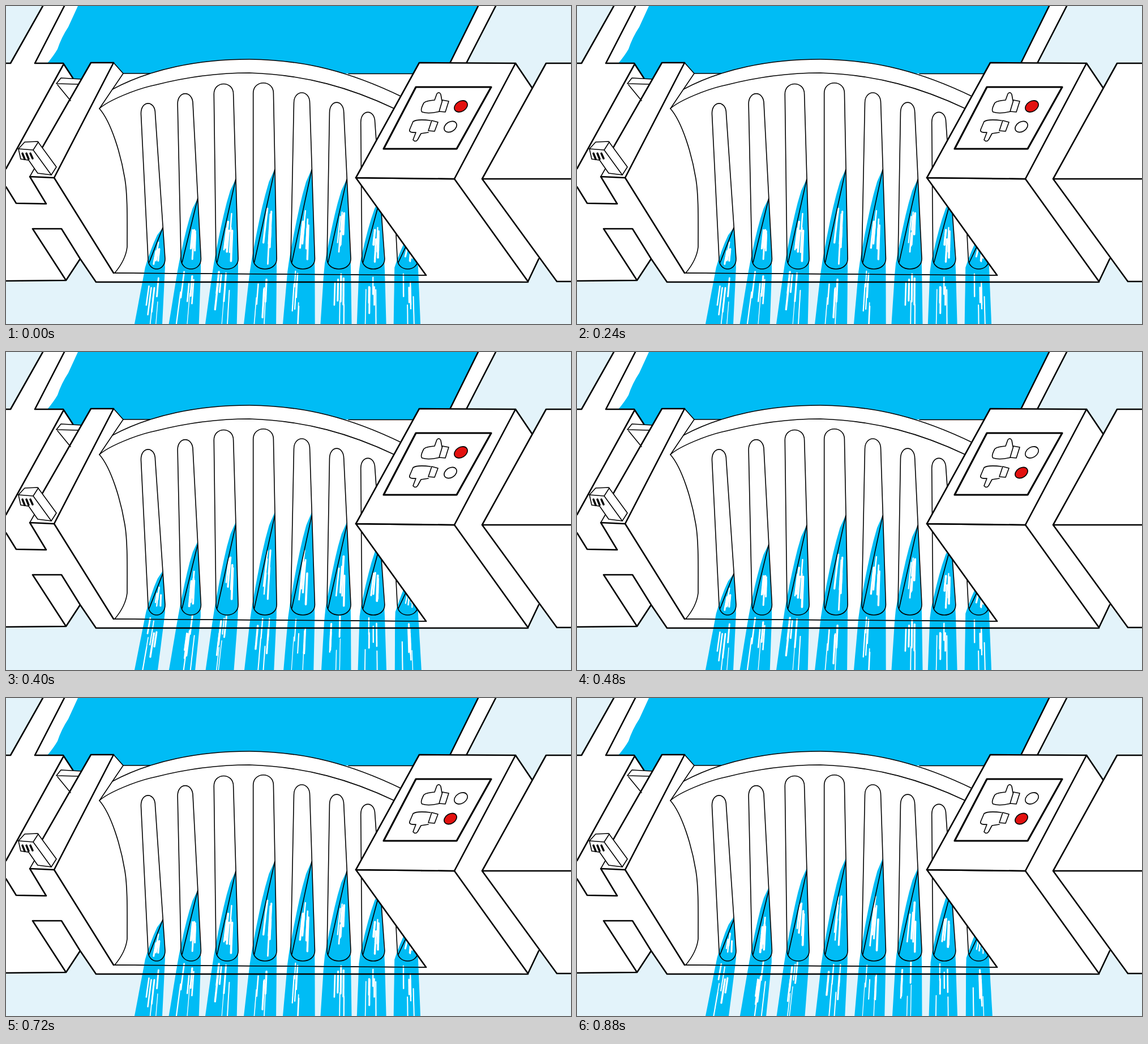
An HTML page for the animation above (960 ms loop, 998 by 561 pixels).

```html
<!DOCTYPE html>
<html lang="en">
<head>
<meta charset="utf-8">
<title>Water gate</title>
<style>
  html, body { margin: 0; height: 100%; overflow: hidden; background: #fff; }
  svg { display: block; width: 100vw; height: 100vh; }
  path, ellipse { fill: none; stroke: #000; stroke-width: 2.6; stroke-linejoin: round; stroke-linecap: round; }
  .thin path, .thin { stroke-width: 1.6; }
  .white { fill: #fff; }
  .sky { fill: #e3f3fa; stroke: none; }
  .blue { fill: #00bcf5; stroke: none; }
  .streak { stroke: #fff; }
  .lit { fill: #e3110f; }
</style>
</head>
<body>
<svg viewBox="0 0 998 561" preserveAspectRatio="none">
  <!-- ground and basin -->
  <path class="sky" d="M0 0H65L8 101H0Z M865 0H998V101H954L929 144 900 101H813Z
    M0 485H106L131 446 159 487H922L941 446 973 486H998V561H0Z"/>
  <path class="blue" d="M127 0H834L785 101H730L720 119H207L190 100H150L133 128H118L101 101H73Q84 88 91 76 98 55 110 37Z"/>
  <path d="M65 0 8 101H0 M103 0 51 101H101L118 127 M834 0 784 101 M865 0 813 101"/>

  <!-- rack -->
  <g class="thin">
    <path d="M190 100 207 119H258 M605 119.500H722 M207 119 188 147"/>
    <path class="white" d="M165 181 188 147C255 111 340 94 430 94 530 95 610 117 699 160L686 181Z"/>
    <path class="white" d="M165 181C180 167 230 146 265 139 320 125 375 118 430 118 530 121 610 145 686 181L742 475 192 471
      C203 458 212 443 214 425 214 380 215 335 210 305 203 262 186 205 165 181"/>
  </g>
  <g id="water"></g>
  <g id="slots" class="thin"></g>

  <!-- left gate -->
  <path d="M190 471 85 303 42 301 71 349 18 348 0 319 M101 104 0 287 M47 393H98L131 446 159 487H922
    M47 393 106 484 131 446 M106 484 0 485"/>
  <path class="white" d="M85 303 190 100H150L57 262"/>
  <g class="thin">
    <path d="M190 471 742 475 M133 129 97 127 89 137 127 138 M91 139 114 167"/>
    <path class="white" d="M22 252 33 240 56 239 89 284 80 298 56 295 40 272 26 270Z"/>
    <path d="M22 252 48 254 57 240 M48 254 80 298 M42 301 50 287"/>
    <path style="stroke-width:3.5" d="M29 260 33 270 M36 260 40 270 M43 260 47 269"/>
  </g>

  <!-- control block -->
  <path class="white" d="M618 303 792 305 922 486 742 475Z" style="stroke:none"/>
  <path d="M742 475 618 303 792 305 922 486 941 446"/>
  <path class="white" d="M618 303 730 100 900 101 792 305Z"/>
  <path d="M900 101 929 144 M998 101H954L841 305H998 M841 305 973 486H998"/>
  <path style="stroke-width:3.2" d="M724 143H857L796 252H667Z"/>
  <g class="thin">
    <path d="M766 186Q746 191 735 187 731 184 738 171 742 167 757 166L761 155Q765 150 768 156L770 167
      M771 166 782 168 776 187 765 186Z"/>
    <path d="M750 202Q726 199 719 204L713 218Q711 224 724 223L719 236Q723 241 727 236L733 225 746 223
      M752 202 763 205 757 221 746 220Z"/>
    <ellipse id="up" rx="12.5" ry="9" transform="translate(803.5 177) rotate(-32)" class="thin"/>
    <ellipse id="down" rx="12" ry="8.5" transform="translate(785 213) rotate(-32)" class="thin"/>
  </g>
</svg>
<script>
const COUNT = 8, LIP = 460, BOTTOM = 561;
const $ = id => document.getElementById(id);
const mix = (a, b, t) => a + (b - a) * t;
const range = n => [...Array(n).keys()];

let seed = 7;
const rand = (a, b) => {
  seed = (seed * 16807) % 2147483647;
  return mix(a, b, seed / 2147483647);
};

function addPath(parent, attrs) {
  const el = document.createElementNS("http://www.w3.org/2000/svg", "path");
  for (const key in attrs) el.setAttribute(key, attrs[key]);
  return parent.appendChild(el);
}

const line = points => "M" + points.map(p => p.map(v => v.toFixed(1)).join(" ")).join("L");

// The slots fan out along the arch, tallest and widest near the middle
const slots = range(COUNT).map(i => {
  const sway = Math.sin(i * Math.PI / 3);
  const topX = 251 + 71 * i - 1.05 * i * i - 5 * sway;
  const lowX = 266 + 63.8 * i - 3.5 * sway;
  const topHalf = 12.5 + 6 * Math.exp(-(((i - 2.6) / 1.2) ** 2));
  const lowHalf = 15 + 3 * i - 0.36 * i * i;
  const top = 128 + 17.2 * Math.abs(i - 2.55);
  const tipY = 285 + 8.6 * (i - 3.5) ** 2;
  const topRight = topX + topHalf, right = lowX + lowHalf;
  return {
    i, top, topLeft: topX - topHalf, topRight, left: lowX - lowHalf, right, tipY,
    tipX: mix(topRight, right, (tipY - top - 18) / (428 - top))
  };
});

// Offsets of each pose from its slot; left and right are taken where the water leaves the stage
const poses = [
  { tip: 0, lip: -5, left: i => 2.5 * i - 24, right: i => 1.3 * i - 5, dense: 6 },
  { tip: 3, lip: -1, left: () => -7, right: () => -2, dense: 4 },
  { tip: -5, lip: -4, left: i => 2.8 * i - 24, right: i => 2.7 * i - 13, dense: 5 }
];

function drawStream(group, slot, pose) {
  const tipY = slot.tipY + pose.tip, fall = LIP - tipY;
  const at = (y, side) => {
    const u = (y - tipY) / fall, v = (y - LIP) / (BOTTOM - LIP);
    const lip = slot.left + pose.lip;
    const left = u < 1 ? mix(slot.tipX, lip, u ** 0.7) : lip + (slot.left + pose.left(slot.i) - lip) * v;
    const right = u < 1 ? mix(slot.tipX, slot.right, u) : slot.right + pose.right(slot.i) * v;
    return [mix(left, right, side), y];
  };
  const run = (from, to, side) => range(13).map(k => at(mix(from, to, k / 12), side));
  const streak = (from, length, side, width) => addPath(group, {
    class: "streak", d: line(run(from, from + length, side)), style: `stroke-width:${width.toFixed(1)}`
  });

  addPath(group, { class: "blue", d: line([...run(tipY, BOTTOM, 0), ...run(tipY, BOTTOM, 1).reverse()]) + "Z" });
  for (let k = 0; k < pose.dense; k++) {
    streak(tipY + fall * rand(0.38, 0.62), fall * rand(0.2, 0.36), rand(0.35, 0.75), rand(2, 4));
  }
  for (let k = 0; k < 4; k++) streak(rand(465, 500), rand(25, 50), rand(0.25, 0.75), rand(2, 3.6));
  for (let k = 0; k < 2; k++) streak(rand(500, 530), 70, rand(0.2, 0.85), rand(1.2, 2.2));
}

const groups = poses.map(pose => {
  const group = $("water").appendChild(document.createElementNS("http://www.w3.org/2000/svg", "g"));
  slots.forEach(slot => drawStream(group, slot, pose));
  return group;
});

for (const { top, topLeft, topRight, left, right, tipX, tipY } of slots) {
  const cap = top - 6, shoulder = top + 18, base = 446, cup = 470;
  addPath($("slots"), {
    d: `M${left} ${base}L${topLeft} ${shoulder}C${topLeft} ${cap} ${topRight} ${cap} ${topRight} ${shoulder}
      L${right} ${base}C${right} ${cup} ${left} ${cup} ${left} ${base}M${tipX} ${tipY}L${left + 2} ${base + 6}`
  });
}

function draw() {
  const step = Math.floor(performance.now() % 960 / 80);
  groups.forEach((group, i) => group.style.display = i === step % 3 ? "" : "none");
  $("up").classList.toggle("lit", step < 6);
  $("down").classList.toggle("lit", step >= 6);
  requestAnimationFrame(draw);
}
draw();
</script>
</body>
</html>
```
